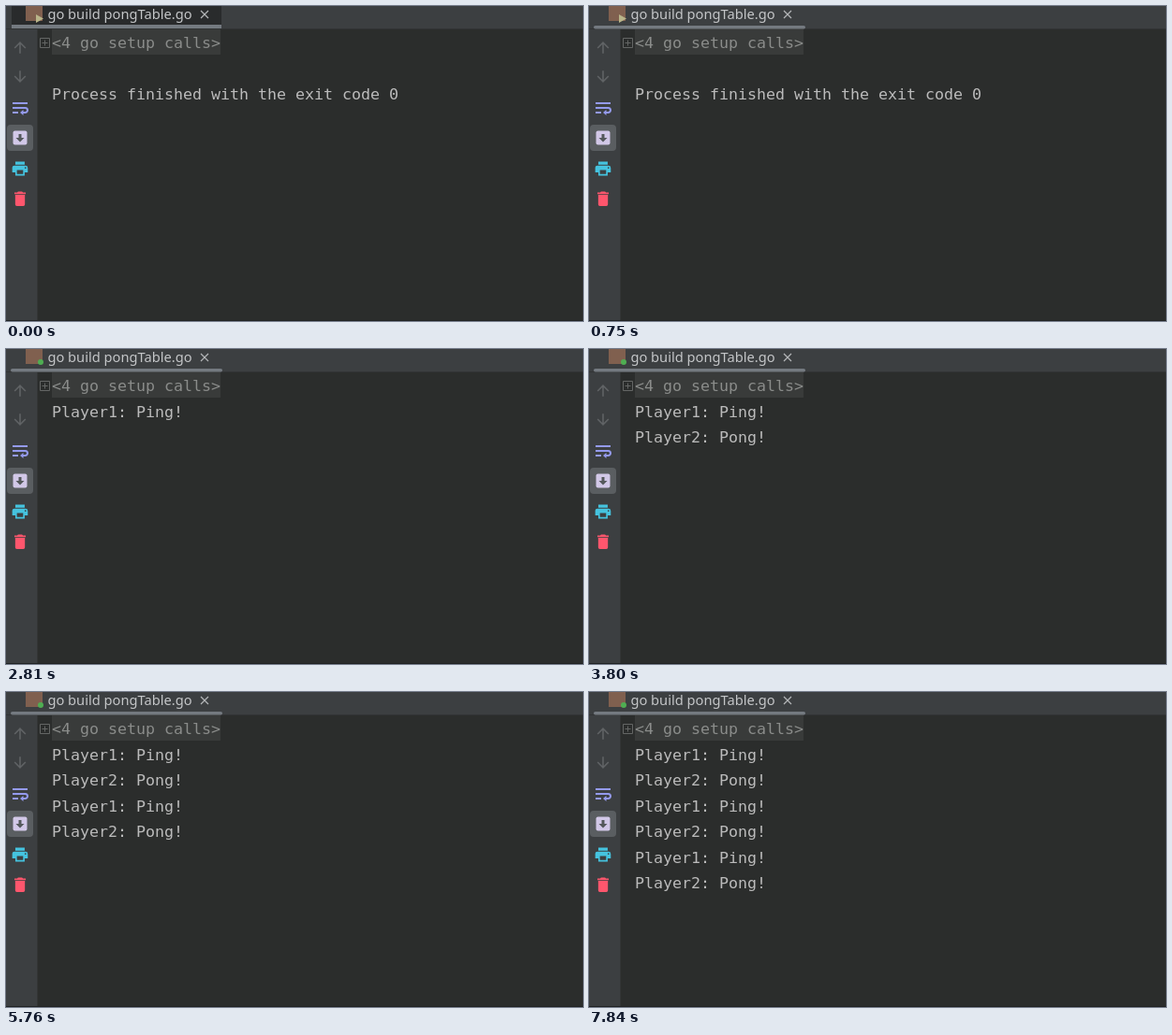
Write an HTML page that moves like this. It is 616 by 337 pixels and loops after 8 s.

```html
<!DOCTYPE html>
<html lang="en">
<head>
<meta charset="utf-8">
<title>Ping pong run console</title>
<style>
  html, body { margin: 0; width: 100%; height: 100%; overflow: hidden; background: #2b2d2c; }
  svg { display: block; width: 616px; height: 337px; }
  text { white-space: pre; }
  .mono { font: 16.61px "DejaVu Sans Mono", "Noto Sans Mono", monospace; fill: #bbbbbb; }
  .tab { font: 14.667px "Noto Sans", "Open Sans", sans-serif; fill: #c4c6c8; }
</style>
</head>
<body>
<svg viewBox="0 0 616 337">
  <rect width="616" height="337" fill="#2b2d2c"/>
  <rect width="616" height="24" fill="#3c3f41"/>
  <rect y="24" width="616" height="1" fill="#323435"/>
  <rect y="25" width="33" height="312" fill="#3c3f41"/>
  <rect x="33" y="25" width="1" height="312" fill="#333536"/>
  <rect y="336" width="616" height="1" fill="#202223"/>

  <!-- Tab -->
  <g id="hover">
    <rect x="6" width="224" height="21" fill="#292b2c"/>
    <rect x="6" y="20" width="224" height="4" fill="#747a80"/>
  </g>
  <rect id="edge" x="191" width="1" height="21" fill="#303233"/>
  <rect id="underline" x="5" y="21" width="226" height="3.500" rx="1.750" fill="#747a80"/>
  <rect x="21" width="18" height="16" fill="#80604f"/>
  <path id="idle" d="M32 9l8 4.500-8 4.500z" fill="#b9b58a"/>
  <circle id="running" cx="37" cy="14" r="3" fill="#4fae52"/>
  <text class="tab" x="44.400" y="14">go build pongTable.go</text>
  <path d="M208 5l8 8m0-8l-8 8" stroke="#b4b6b8" stroke-width="1.200"/>

  <!-- Toolbar -->
  <rect x="1" y="127" width="28" height="28" rx="4" fill="#5a5e61"/>
  <g fill="#606365">
    <path id="arrow" transform="translate(5.400 34.800) scale(.8)" d="M4 12l1.410 1.410L11 7.830V20h2V7.830l5.580 5.590L20 12l-8-8-8 8z"/>
    <use href="#arrow" transform="translate(0 120) scale(1 -1)"/>
  </g>
  <path d="M7 104h16M7 109h13.500a2.500 2.500 0 0 1 0 5H18M7 114h6" fill="none" stroke="#949aee" stroke-width="2"/>
  <path d="M18.500 111v6l-3.500-3z" fill="#949aee"/>
  <rect x="7.500" y="133.500" width="15" height="15" rx="2" fill="#d2c8e8"/>
  <path d="M13.500 137h3v4h3l-4.500 4.500-4.500-4.500h3z" fill="#55595c"/>
  <path transform="translate(5 164) scale(.83)" fill="#45c3df" fill-rule="evenodd" d="M19 8H5a3 3 0 0 0-3 3v6h4v4h12v-4h4v-6a3 3 0 0 0-3-3zM16 19H8v-5h8zM19 12a1 1 0 1 1 0-2 1 1 0 0 1 0 2zM18 3H6v4h12z"/>
  <path transform="translate(4.700 196) scale(.86)" fill="#ff566d" d="M6 19a2 2 0 0 0 2 2h8a2 2 0 0 0 2-2V7H6zM19 4h-3.500l-1-1h-5l-1 1H5v2h14z"/>

  <!-- Console -->
  <rect x="49" y="25" width="180" height="27" fill="#393b3a"/>
  <path d="M36.500 34.500h10v10h-10zM38.500 39.500h6M41.500 36.500v6" fill="none" stroke="#646665"/>
  <text class="mono" x="49" y="45" style="fill:#8a8c8a">&lt;4 go setup calls&gt;</text>
  <text class="mono" id="exit" x="49" y="100">Process finished with the exit code 0</text>
  <g id="log"></g>
</svg>
<script>
  const LOOP = 8000;
  const RUN_START = 2600;
  const HITS = [2810, 3800, 4780, 5760, 6850, 7840];
  const byId = id => document.getElementById(id);
  const show = (el, on) => el.setAttribute("visibility", on ? "visible" : "hidden");

  const [hover, edge, underline, idle, running, exit, log] =
    ["hover", "edge", "underline", "idle", "running", "exit", "log"].map(byId);

  const lines = HITS.map((_, i) => {
    const line = document.createElementNS("http://www.w3.org/2000/svg", "text");
    line.setAttribute("class", "mono");
    line.setAttribute("x", 49);
    line.setAttribute("y", Math.round(73 + i * 27.4));
    line.textContent = i % 2 ? "Player2: Pong!" : "Player1: Ping!";
    return log.appendChild(line);
  });

  function draw(t) {
    const started = t >= RUN_START;
    show(hover, t < 100);
    show(underline, t >= 100);
    show(edge, t >= 100 && t < 750);
    show(idle, !started);
    show(running, started);
    show(exit, !started);
    lines.forEach((line, i) => show(line, t >= HITS[i]));
  }

  const origin = performance.now();
  function tick() {
    draw((performance.now() - origin) % LOOP);
    requestAnimationFrame(tick);
  }
  draw(0);
  requestAnimationFrame(tick);
</script>
</body>
</html>
```
